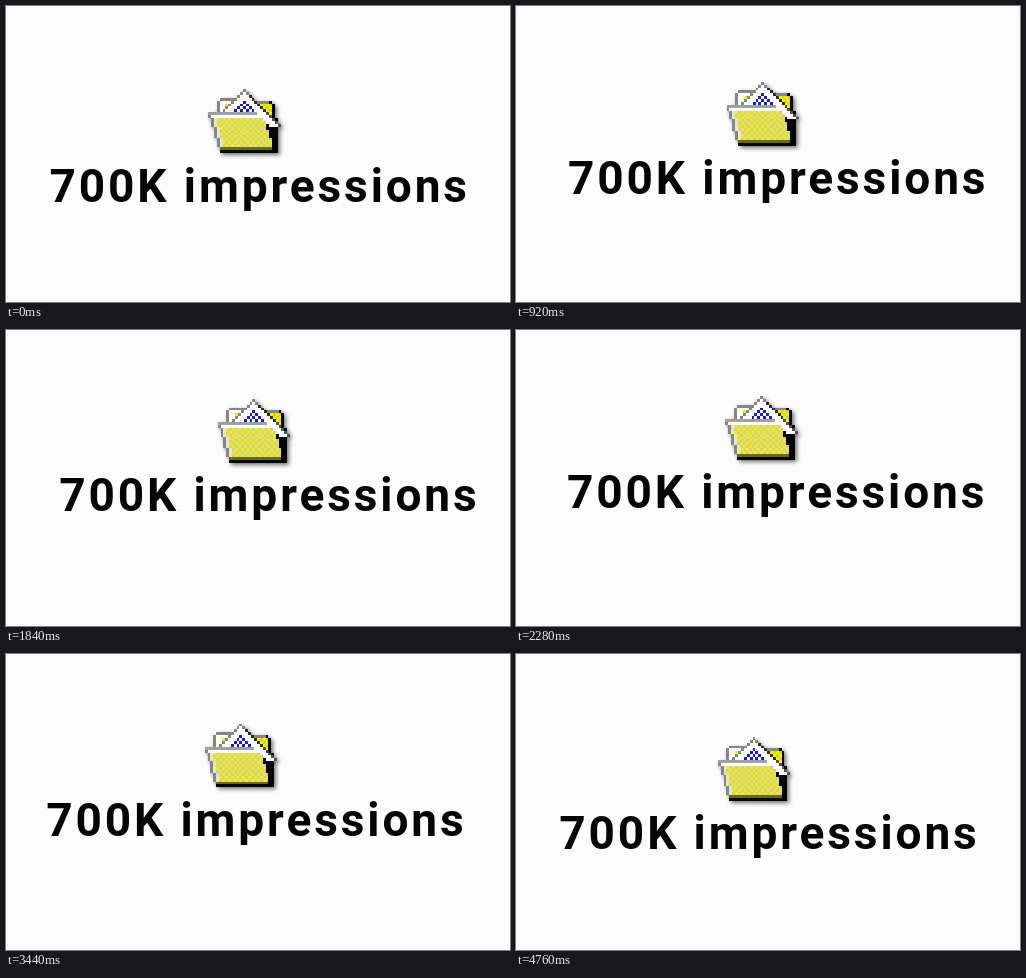
Animation, 504 px wide and 296 px high, one loop 4.8 s. Source, as an HTML page with a canvas:

```html
<!DOCTYPE html>
<html lang="en">
<head>
<meta charset="utf-8">
<title>Floating folder</title>
<style>
  html, body { margin: 0; width: 100%; height: 100%; overflow: hidden; background: #fcfcfc; }
  canvas { display: block; }
</style>
</head>
<body>
<canvas id="stage" width="504" height="296"></canvas>
<script>
const LOOP = 4800, STEP = 40, CELL = 2.9, COLS = 25, ROWS = 23;
const ctx = document.getElementById('stage').getContext('2d');

// Drift path: time, x offset, y offset
const path = [
  [0, 0, 0], [560, 5, -4.6], [920, 8.5, -7.3], [1400, 10.9, -10.7],
  [1680, 10.3, -12.9], [2280, 7.4, -17.1], [2840, 2.6, -16.6],
  [3360, -2.7, -13.9], [3640, -4.3, -12.1], [4040, -3, -8.6], [4480, -1, -4]
];

function knot(i) {
  const n = path.length, lap = Math.floor(i / n);
  const [t, x, y] = path[i - lap * n];
  return [t + lap * LOOP, x, y];
}

// Closed cubic Hermite curve through the path points
function drift(t) {
  let i = path.length - 1;
  while (path[i][0] > t) i--;
  const [a, b, c, d] = [-1, 0, 1, 2].map(k => knot(i + k));
  const span = c[0] - b[0], u = (t - b[0]) / span;
  return [1, 2].map(k => {
    const m0 = (c[k] - a[k]) / (c[0] - a[0]) * span;
    const m1 = (d[k] - b[k]) / (d[0] - b[0]) * span;
    const u2 = u * u, u3 = u2 * u;
    return (2 * u3 - 3 * u2 + 1) * b[k] + (u3 - 2 * u2 + u) * m0
         + (3 * u2 - 2 * u3) * c[k] + (u3 - u2) * m1;
  });
}

function makeFolder() {
  const icon = document.createElement('canvas');
  icon.width = COLS;
  icon.height = ROWS;
  const g = icon.getContext('2d');
  const fill = (x, y, w, h, color) => { g.fillStyle = color; g.fillRect(x, y, w, h); };
  const checker = (x, y, w, a, b) => {
    for (let i = x; i < x + w; i++) fill(i, y, 1, 1, (i + y) % 2 ? a : b);
  };
  const yellow = '#f4f000', pale = '#cdcda6', gray = '#868686', ink = '#060606';

  // back of the folder
  fill(4, 3, 5, 1, gray);
  fill(3, 4, 1, 4, gray);
  fill(4, 4, 5, 4, '#fff');
  for (let y = 5; y < 8; y++) checker(6, y, 4, yellow, '#e8e8d0');
  fill(17, 4, 4, 1, gray);
  for (let y = 5; y < 9; y++) checker(16, y, 6, yellow, '#d8d420');
  fill(21, 4, 1, 1, ink);
  fill(22, 5, 1, 5, ink);

  // sheet of paper
  for (let y = 0; y < 8; y++) {
    fill(12 - y, y, 2 * y + 1, 1, '#fff');
    fill(12 - y, y, 1, 1, gray);
    fill(12 + y, y, 1, 1, y < 2 ? gray : '#2c2c2c');
    if (y > 3) checker(16 - y, y, 2 * y - 7, '#fff', '#1818e0');
  }

  // front panel
  for (let y = 8; y < 21; y++) {
    const left = Math.round((y - 8) * 0.3);
    const right = 19 + Math.round((y - 8) * 0.28);
    checker(left + 1, y, right - left - 1, yellow, pale);
    fill(left, y, 1, 1, gray);
    fill(left + 1, y, 1, 1, '#e6e6d0');
    if (y > 9) fill(right, y, 24 - right, 1, ink);
  }
  fill(0, 8, 20, 1, '#a0a0a0');
  fill(1, 9, 18, 1, '#fff');
  fill(4, 20, 18, 1, '#6c6a10');
  fill(4, 21, 20, 1, ink);

  // folded paper corner
  for (let y = 8; y < 13; y++) {
    fill(9 + y, y, 3, 1, '#fff');
    fill(12 + y, y, 1, 1, '#505050');
  }
  fill(20, 12, 1, 1, ink);
  return icon;
}

const folder = makeFolder();

function draw(now) {
  const t = Math.floor((now % LOOP) / STEP) * STEP;
  const [dx, dy] = drift(t);
  ctx.setTransform(1, 0, 0, 1, 0, 0);
  ctx.fillStyle = '#fcfcfc';
  ctx.fillRect(0, 0, 504, 296);
  ctx.translate(dx, dy);

  ctx.save();
  ctx.imageSmoothingEnabled = false;
  ctx.shadowColor = 'rgba(0, 0, 0, .55)';
  ctx.shadowBlur = 4;
  ctx.shadowOffsetX = ctx.shadowOffsetY = 2;
  ctx.drawImage(folder, 202, 83, COLS * CELL, ROWS * CELL);
  ctx.restore();

  ctx.fillStyle = '#050505';
  ctx.font = 'bold 46px Roboto, sans-serif';
  ctx.letterSpacing = '2.9px';
  ctx.fillText('700K impressions', 43.5, 195.5);
}

const start = performance.now();
function tick() {
  draw(performance.now() - start);
  requestAnimationFrame(tick);
}
tick();
</script>
</body>
</html>
```
